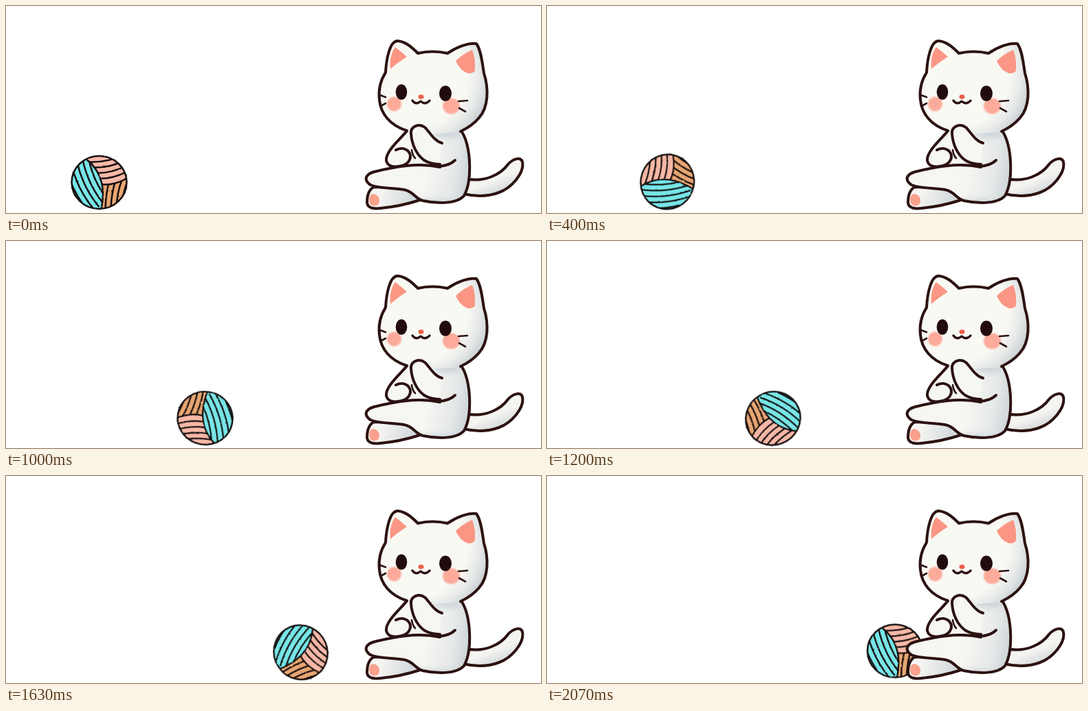
An HTML page that plays this animation: 778 by 302 pixels, repeating every 2.1 s.

```html
<!DOCTYPE html>
<html lang="en">
<head>
<meta charset="utf-8">
<title>Cat and yarn ball</title>
<style>
  html, body { margin: 0; width: 100%; height: 100%; overflow: hidden; background: #fff; }
  svg { display: block; width: 100vw; height: 100vh; }
  .line { fill: none; stroke: #2b1211; stroke-width: 4; stroke-linecap: round; stroke-linejoin: round; }
  .thin { stroke-width: 2.6; }
  .yarn { fill: none; stroke: #141010; stroke-width: 2.5; }
</style>
</head>
<body>
<svg viewBox="0 0 778 302">
  <defs>
    <radialGradient id="headFill" gradientUnits="userSpaceOnUse" cx="598" cy="103" r="106">
      <stop offset=".68" stop-color="#f9f9f4"/><stop offset=".86" stop-color="#e6e9e8"/><stop offset="1" stop-color="#cbd2d5"/>
    </radialGradient>
    <linearGradient id="bodyFill" gradientUnits="userSpaceOnUse" x1="585" y1="220" x2="680" y2="236">
      <stop offset=".3" stop-color="#f6f6f2"/><stop offset=".7" stop-color="#e6e9e9"/><stop offset="1" stop-color="#c8d0d4"/>
    </linearGradient>
    <linearGradient id="footFill" gradientUnits="userSpaceOnUse" x1="545" y1="272" x2="590" y2="284">
      <stop stop-color="#f5f5f2"/><stop offset="1" stop-color="#d3d9dc"/>
    </linearGradient>
    <linearGradient id="tailFill" gradientUnits="userSpaceOnUse" x1="705" y1="245" x2="718" y2="277">
      <stop offset=".3" stop-color="#f4f4f1"/><stop offset="1" stop-color="#cdd3d7"/>
    </linearGradient>
    <filter id="rough" x="-10%" y="-10%" width="120%" height="120%">
      <feTurbulence type="fractalNoise" baseFrequency=".35" numOctaves="1" seed="4"/>
      <feDisplacementMap in="SourceGraphic" scale="2.2" xChannelSelector="R" yChannelSelector="G"/>
    </filter>
    <filter id="soft" x="-30%" y="-30%" width="160%" height="160%"><feGaussianBlur stdDeviation="1"/></filter>
    <filter id="shade" x="-40%" y="-100%" width="180%" height="300%"><feGaussianBlur stdDeviation="5"/></filter>
    <clipPath id="ballClip"><ellipse rx="40" ry="38.5"/></clipPath>
    <clipPath id="pinkClip"><path d="M-18-33Q4-15 5 3Q22 5 42-7V-45H-18Z"/></clipPath>
    <clipPath id="brownClip"><path d="M5 3Q22 5 42-7V45H3Q8 20 5 3Z"/></clipPath>
    <clipPath id="cyanClip"><path d="M-18-33Q13-8 3 39H-45V-45Z"/></clipPath>
    <path id="bodyShape" d="M583 180C575 192 551 210 553 226C556 237 574 235 590 231C570 234 550 238 535 242C522 246 520 255 530 261C545 267 565 265 579 268C593 272 594 280 606 284C626 289 655 290 666 277C679 258 676 211 662 180Z"/>
    <clipPath id="bodyClip"><use href="#bodyShape"/></clipPath>
  </defs>

  <g id="ball" filter="url(#rough)">
    <g clip-path="url(#ballClip)">
      <g clip-path="url(#pinkClip)"><rect x="-45" y="-45" width="90" height="90" fill="#f7b8a7"/><g id="pinkYarn" class="yarn"/></g>
      <g clip-path="url(#brownClip)"><rect x="-45" y="-45" width="90" height="90" fill="#e8a672"/><g id="brownYarn" class="yarn"/></g>
      <g clip-path="url(#cyanClip)"><rect x="-45" y="-45" width="90" height="90" fill="#78e6e8"/><g id="cyanYarn" class="yarn"/></g>
      <path class="yarn" d="M-18-33Q13-8 3 39M5 3Q22 5 42-7"/>
    </g>
    <ellipse class="yarn" rx="40" ry="38.6"/>
  </g>

  <g id="cat">
    <path class="line" style="fill:url(#tailFill)" d="M668 252C697 258 720 245 730 231C737 223 749 219 751 228C754 243 736 265 717 272C699 279 682 278 665 274"/>
    <path class="line" style="fill:url(#footFill)" d="M535 264C527 268 525 278 525 287C526 296 537 296 545 295C566 293 584 289 602 283L586 266Z"/>
    <path fill="#f9a18d" d="M530 276C534 272 541 275 543 282C544 289 539 293 533 291C527 289 527 280 530 276Z"/>
    <use href="#bodyShape" fill="url(#bodyFill)"/>
    <g clip-path="url(#bodyClip)" fill="#c9d2d8" filter="url(#shade)">
      <ellipse cx="642" cy="186" rx="24" ry="6"/><ellipse cx="628" cy="289" rx="38" ry="6"/>
    </g>
    <path class="line" d="M583 182C576 192 551 212 553 226C556 236 568 235 576 233C588 229 591 219 585 212C580 207 573 207 567 210"/>
    <path class="line" d="M662 182C677 205 678 256 666 277C654 290 624 288 606 284C594 280 593 271 579 268C563 265 545 267 530 261C520 254 522 246 535 242C563 235 597 228 631 235"/>
    <path class="line" d="M653 225Q645 233 629 234"/>

    <path class="line" style="fill:url(#headFill);stroke:none" d="M552 97C553 78 558 49 570 50C581 52 590 60 599 69Q620 64 642 69C655 60 673 53 684 55C691 64 693 86 695 98C702 120 702 147 688 163Q678 175 661 183Q622 190 583 182C558 174 545 157 543 137C541 120 545 108 552 97Z"/>
    <path class="line" d="M583 182C558 174 545 157 543 137C541 120 545 108 552 97C553 78 558 50 570 51C581 52 590 60 599 69Q620 64 642 69C655 60 673 53 684 55C691 64 693 86 695 98C702 120 702 147 688 163Q678 175 661 183"/>
    <path fill="#fb9684" d="M566 60C559 69 558 82 559 92Q569 83 583 74Q574 66 566 60Z"/>
    <path fill="#fb9684" d="M678 64Q664 70 654 80Q660 94 671 98Q680 99 682 94Q683 76 678 64Z"/>

    <path fill="#f6f6f2" d="M634 200C622 197 615 182 609 177C601 171 588 175 588 185C589 202 596 218 607 226Q617 232 631 230Z"/>
    <path class="line" d="M634 200C622 197 615 182 609 177C601 171 588 175 589 186C590 202 597 217 608 225Q618 231 631 231"/>
    <path class="line thin" d="M590 210Q591 218 595 222"/>

    <g filter="url(#soft)" fill="#fcaa99">
      <circle cx="564.5" cy="143" r="10.5"/><ellipse cx="647.5" cy="146" rx="12.5" ry="11.5"/>
    </g>
    <path class="line thin" d="M544 130L552 133M545 146L552 142M658 139L671 138M659 149L668 154"/>
    <ellipse cx="603.5" cy="132.5" rx="4" ry="3.2" fill="#ee6049"/>
    <path class="line" style="stroke-width:3.4" d="M591 138Q596 145 603 139Q610 145 616 138"/>
    <g id="openEyes" fill="#220b0d">
      <ellipse cx="575" cy="125.5" rx="8.3" ry="11.3"/><ellipse cx="639" cy="127.5" rx="9" ry="11.3"/>
    </g>
    <g id="closedEyes" class="line">
      <path d="M569 126.500Q580 130 590 125.500M629 129Q640 132 650 129.500"/>
      <path class="thin" d="M570 127L569 130M576 128L574 131M584 128L585 130M632 129L630 132M638 131L637 133M646 131L648 133"/>
    </g>
  </g>
</svg>
<script>
const $ = id => document.getElementById(id);
const LOOP = 2100, FRAME = 100 / 3;

// time, x, y, turn; equal neighbours are rests
const path = [
  [0, 135.5, 257.3, 0], [200, 151, 257, -35], [400, 175, 256.5, -70],
  [533, 199.5, 257, -94], [567, 199.5, 257, -94], [767, 242, 257.8, -123],
  [1100, 310, 258.8, -191], [1200, 328.7, 258.8, -212], [1467, 379.5, 258.5, -261],
  [1633, 428.5, 257.3, -304], [1800, 481.5, 256, -347], [1867, 481.5, 256, -347],
  [2067, 506, 255.2, -360]
];

function strands(id, count, curve) {
  $(id).innerHTML = Array.from({ length: count }, (_, i) => `<path d="${curve(i + 1)}"/>`).join("");
}
strands("cyanYarn", 6, i => `M${-8 - 8 * i} ${-41 + 4 * i}Q${-1 - 7.5 * i} ${-4 + 4 * i} ${21 - 7 * i} ${24 + 4 * i}`);
strands("pinkYarn", 4, i => `M${-2 - 5 * i} ${2 - 8 * i}Q${18 - i} ${5 - 8 * i} 43 ${-8 - 9 * i}`);
strands("brownYarn", 4, i => `M${7 + 9 * i} -6Q${1 + 8 * i} 16 ${1 + 8 * i} 42`);

function ballAt(t) {
  const next = path.findIndex(key => key[0] > t);
  if (next < 0) return path[path.length - 1];
  const a = path[next - 1], b = path[next];
  const k = (t - a[0]) / (b[0] - a[0]);
  return a.map((v, i) => v + (b[i] - v) * k);
}

function draw(now) {
  const t = Math.floor((now % LOOP) / FRAME + 0.11) * FRAME;
  const [, x, y, turn] = ballAt(t);
  $("ball").setAttribute("transform", `translate(${x} ${y}) rotate(${turn})`);
  const blinking = t > 1370 && t < 1590;
  $("openEyes").style.display = blinking ? "none" : "";
  $("closedEyes").style.display = blinking ? "" : "none";
}

const start = performance.now();
function tick() {
  draw(performance.now() - start);
  requestAnimationFrame(tick);
}
tick();
</script>
</body>
</html>
```
